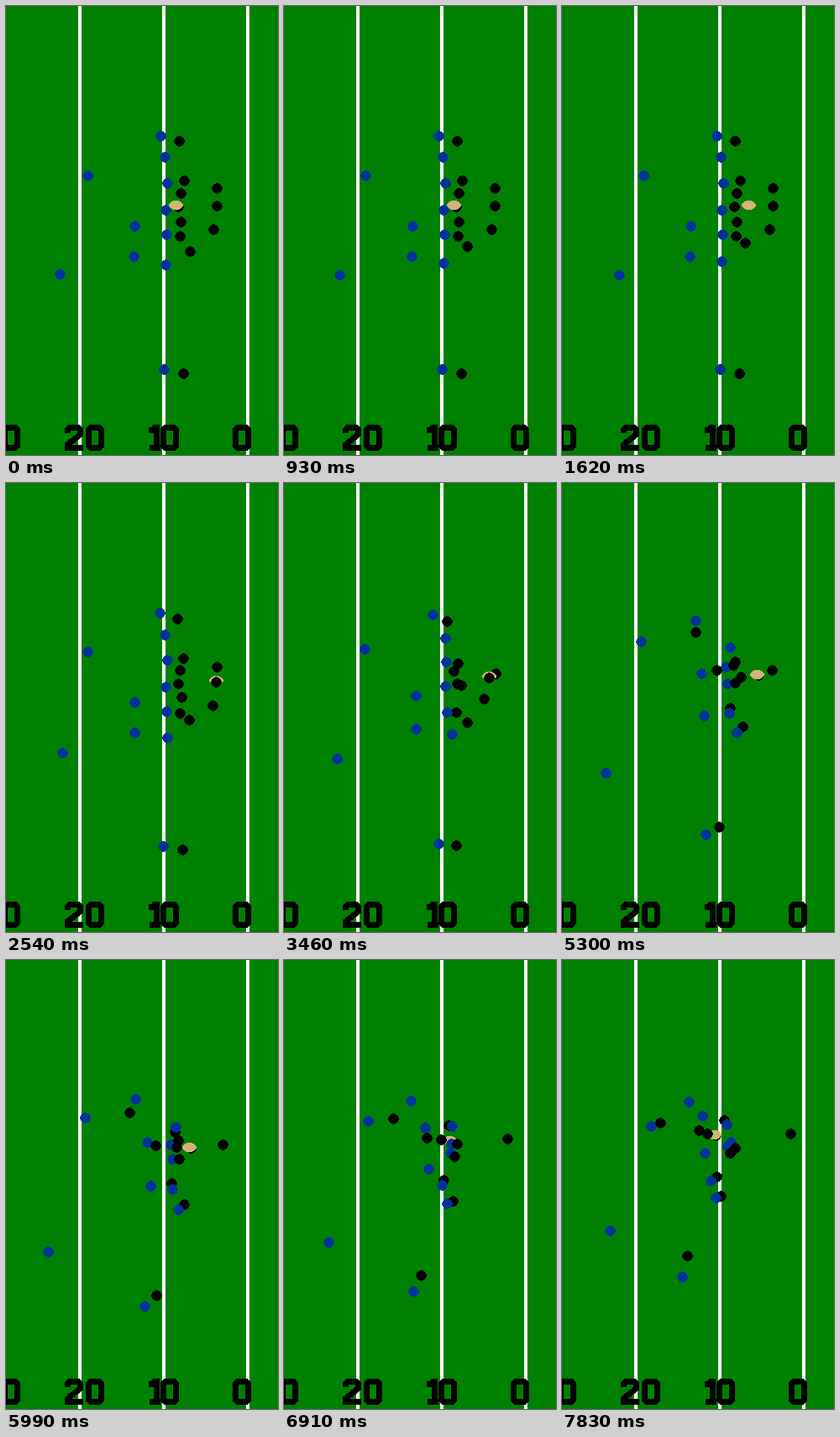
Animation, 324 px wide and 533 px high, one loop 8000 ms. Source, as an HTML page:

```html
<!DOCTYPE html>
<html lang="en">
<head>
<meta charset="utf-8">
<title>Football play</title>
<style>
  html, body { margin: 0; width: 100%; height: 100%; overflow: hidden; background: #008000; }
  svg { display: block; width: 100%; height: 100%; }
</style>
</head>
<body>
<svg viewBox="0 0 324 533" shape-rendering="crispEdges">
  <defs>
    <path id="d0" d="M6 3.5H16L18.5 6V25L16 27.5H6L3.5 25V6Z"/>
    <path id="d1" d="M0 6.5H4L7 3.5H9.5V27.5M1 27.5H14"/>
    <path id="d2" d="M3.5 10V6L6 3.5H16L18.5 6V11.5L3.5 23.5V27.5H22"/>
  </defs>
  <rect width="324" height="533" fill="#008000"/>
  <path d="M88 0V533M188 0V533M288 0V533" stroke="#fff" stroke-width="4"/>
  <g fill="none" stroke="#000" stroke-width="7" role="img" aria-label="0 20 10 0">
    <use href="#d0" x="-5" y="497"/>
    <use href="#d2" x="70" y="497"/>
    <use href="#d0" x="95" y="497"/>
    <use href="#d1" x="170" y="497"/>
    <use href="#d0" x="184" y="497"/>
    <use href="#d0" x="270" y="497"/>
  </g>
  <g id="field"></g>
</svg>
<script>
const LOOP = 8000, FIRST = 240, STEP = 230, LAST = 34;
// Play moments, counted in steps.
const SET = 7, GO = 9, CUT = 19, MEET = 26;
const HIKE = 5, CATCH = 10, HANDOFF = 22;
const field = document.getElementById('field');

// Routes: start[>pre-snap shift] [cut] meet end
const runner = player('#000', '251,216 248,232 220,223 183,208');
const ball = shape('ellipse', { rx: 8.5, ry: 5.5, fill: '#d2b478' });
const blockers = team('#000', [
  '208,256 212,224 201,204 193,190',
  '207,273 197,265 184,257',
  '219,291>218,281 212,290 189,280'
]);
const defenders = team('#003399', [
  '189,179 202,198 196,195',
  '192,210 196,219 201,216',
  '190,242 198,236 197,221',
  '191,271 198,272 177,262',
  '190,307>190,303 208,294 205,296 183,282',
  '184,154 154,165 151,168',
  '97,201 94,187 106,197',
  '153,261 168,216 167,185',
  '152,297 172,268 170,229',
  '64,318>68,319 50,346 57,321',
  '188,431 165,411 143,376'
]);
const passer = player('#000', '251,237 241,226 258,219 272,206');
const others = team('#000', [
  '212,207 204,218 205,214 206,223',
  '208,222 178,220 163,202',
  '205,238 206,236 200,229',
  '247,265 203,222 173,206',
  '206,160 147,181 117,193',
  '211,436 179,398 149,351'
]);
const players = [runner, ...blockers, ...defenders, passer, ...others];

function shape(tag, attrs) {
  const el = document.createElementNS('http://www.w3.org/2000/svg', tag);
  for (const k in attrs) el.setAttribute(k, attrs[k]);
  return el;
}

function player(fill, route) {
  const [opening, ...rest] = route.split(' ').map(p => p.split('>').map(q => q.split(',').map(Number)));
  const start = opening[0], set = opening[1] || start;
  const run = rest.map(p => p[0]);
  const times = run.length > 2 ? [CUT, MEET, LAST] : [MEET, LAST];
  return {
    t: [0, SET, GO, ...times],
    p: [start, set, set, ...run],
    el: shape('circle', { r: 6.36, fill })
  };
}

function team(fill, routes) {
  return routes.map(r => player(fill, r));
}

// Still until the snap, smooth through the route, slowing at the end.
function slope({ t, p }, i, axis) {
  if (t[i] <= GO) return 0;
  const end = i === t.length - 1, j = end ? i : i + 1;
  return (p[j][axis] - p[i - 1][axis]) / (t[j] - t[i - 1]) * (end ? 0.5 : 1);
}

// Cubic Hermite curve through the waypoints.
function position(who, s) {
  const { t, p } = who;
  let i = 0;
  while (i < t.length - 2 && s >= t[i + 1]) i++;
  const h = t[i + 1] - t[i], u = (s - t[i]) / h, v = 1 - u;
  return [0, 1].map(axis =>
    p[i][axis] * v * v * (1 + 2 * u) + p[i + 1][axis] * u * u * (3 - 2 * u)
    + h * u * v * (v * slope(who, i, axis) - u * slope(who, i + 1, axis)));
}

const ramp = (s, from, to) => Math.min(1, Math.max(0, (s - from) / (to - from)));
const mix = (a, b, u) => a.map((n, i) => n + (b[i] - n) * u);

// Snapped to the passer, then handed to the runner.
function ballAt(s) {
  const [px, py] = position(passer, s), [rx, ry] = position(runner, s);
  const passed = mix([202, 236], [px, py - 2], ramp(s, HIKE, CATCH));
  return mix(passed, [rx - 2, ry - 1], ramp(s, CUT, HANDOFF));
}

function place(el, [x, y]) {
  el.setAttribute('cx', Math.round(x) + 0.5);
  el.setAttribute('cy', Math.round(y) + 0.5);
}

function draw(s) {
  for (const who of players) place(who.el, position(who, s));
  place(ball, ballAt(s));
  // In the air the ball is on top; in hand only its runner is below it.
  field.insertBefore(ball, s < CATCH ? null : blockers[0].el);
}

let last = -1;
function tick(now) {
  const t = now % LOOP;
  const s = t < FIRST ? 0 : Math.min(LAST, Math.floor((t - FIRST) / STEP) + 1);
  if (s !== last) draw(last = s);
  requestAnimationFrame(tick);
}

field.append(...players.map(who => who.el));
draw(0);
requestAnimationFrame(tick);
</script>
</body>
</html>
```
